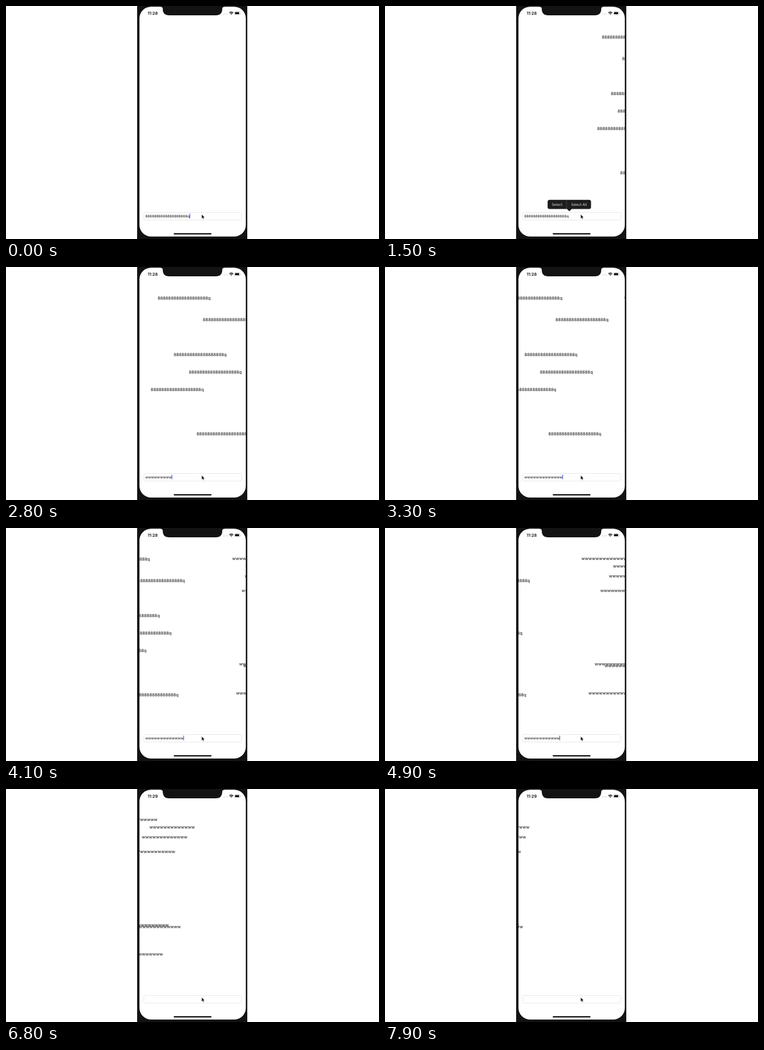
These frames come from a looping animation (640 px wide and 400 px high, 8000 ms). An HTML page:

```html
<!DOCTYPE html>
<html lang="en">
<head>
<meta charset="utf-8">
<title>Flying comments</title>
<style>
  html, body { margin: 0; width: 100%; height: 100%; overflow: hidden; background: #fff; }
  svg { display: block; width: 640px; height: 400px; }
  text { font-family: Inter, Roboto, sans-serif; fill: #0c0c0c; text-rendering: geometricPrecision; white-space: pre; }
  .msg { font-size: 7.35px; }
  .field { font-size: 6.15px; }
  .clock { font-size: 7.2px; font-weight: 600; }
  .menu text { font-size: 6.1px; fill: #e2e2e2; }
</style>
</head>
<body>
<svg viewBox="0 0 640 400">
  <defs>
    <clipPath id="screen"><rect x="228.5" y="1" width="183.3" height="395" rx="20"/></clipPath>
  </defs>

  <rect x="225" width="189" height="400" fill="#131313"/>
  <rect x="229" y="1.2" width="182.5" height="394.6" rx="20" fill="#fff"/>
  <path d="M265 0H375V1.2Q371 1.2 371 5Q371 16 360 16H280Q269 16 269 5Q269 1.2 265 1.2Z" fill="#131313"/>

  <text id="clock" class="clock" x="243" y="14.9">11:28</text>
  <g fill="#b4b4b4">
    <circle cx="373.5" cy="13.6" r=".6"/><circle cx="375.7" cy="13.6" r=".6"/>
    <circle cx="377.9" cy="13.6" r=".6"/><circle cx="380.1" cy="13.6" r=".6"/>
  </g>
  <g fill="none" stroke="#111" stroke-width="1.3">
    <path d="M383.2 11.5Q386.6 8.6 390 11.5"/>
    <path d="M384.5 13.1Q386.6 11.3 388.7 13.1"/>
  </g>
  <path d="M385.5 14.1Q386.6 13.2 387.7 14.1L386.6 15.2Z" fill="#111"/>
  <rect x="392.2" y="9.9" width="9.7" height="4.9" rx="1.4" fill="none" stroke="#999" stroke-width=".5"/>
  <rect x="393" y="10.6" width="7" height="3.5" rx=".7" fill="#111"/>
  <path d="M402.6 11.5Q403.6 12.3 402.6 13.2Z" fill="#999"/>

  <g id="messages" clip-path="url(#screen)"></g>

  <rect x="236.5" y="354.5" width="168" height="13" rx="2.2" fill="#fff" stroke="#e2e2e2" stroke-width=".8"/>
  <text id="field" class="field" x="239" y="363"></text>
  <rect id="caret" y="356.5" width="1" height="8"/>

  <g id="menu" class="menu">
    <path d="M282.5 332.8H350Q353.5 332.8 353.5 336.3V345Q353.5 348.5 350 348.5H320.3L316.3 352.4L312.3 348.5H282.5Q279 348.5 279 345V336.3Q279 332.8 282.5 332.8Z" fill="#1d1d1d"/>
    <path d="M311.6 332.8V348.5" stroke="#666" stroke-width=".5"/>
    <text x="286.2" y="342.9">Select</text>
    <text x="319.4" y="342.9">Select All</text>
  </g>

  <rect x="287.7" y="389.9" width="65" height="2.3" rx="1.15" fill="#111"/>
  <path d="M335.8 357.8V365L337.4 363.5L338.5 366.1L339.8 365.5L338.7 363H340.9Z" fill="#000" stroke="#fff" stroke-width=".5"/>
</svg>

<script>
  const LOOP = 8000, STEP = 100, FLIGHT = 5000, ENTRY = 411.5;
  const byId = id => document.getElementById(id);
  const eights = "8".repeat(19) + "q";
  const ws = n => "w".repeat(n);

  // Each entry: start time in ms, baseline
  const volleys = [
    { text: eights, travel: 283.5, shots: [[80, 212.6], [202, 56], [484, 152.6], [760, 182.6], [908, 289], [1035, 93]] },
    { text: ws(13), travel: 264.5, shots: [[3060, 55.4], [3217, 285.5], [3368, 236.3], [3517, 109.8], [3640, 239.3], [3780, 84.9], [3930, 67.6]] }
  ];

  function addMessage(text, travel, start, y) {
    const node = document.createElementNS("http://www.w3.org/2000/svg", "text");
    node.setAttribute("class", "msg");
    node.setAttribute("y", y);
    node.textContent = text;
    byId("messages").append(node);
    return { node, travel, start };
  }
  const messages = volleys.flatMap(({ text, travel, shots }) =>
    shots.map(([start, y]) => addMessage(text, travel, start, y)));

  // cubic-bezier(.42, 0, .58, 1)
  function easeInOut(x) {
    let lo = 0, hi = 1;
    for (let i = 0; i < 24; i++) {
      const s = (lo + hi) / 2;
      if (1.26 * s - 0.78 * s * s + 0.52 * s ** 3 < x) lo = s; else hi = s;
    }
    return lo * lo * (3 - 2 * lo);
  }

  function fieldText(t) {
    if (t < 1700) return eights;
    if (t < 2400) return "";
    if (t < 4800) return ws(Math.min(13, 1 + Math.floor((t - 2400) / 45)));
    return ws(Math.max(0, Math.min(12, Math.round(12 * (5400 - t) / 500))));
  }

  function caretOn(t) {
    if (t < 1700) return t < 500;
    if (t < 6500) return true;
    return t >= 7000 && t < 7500;
  }

  function draw(t) {
    for (const { node, travel, start } of messages) {
      const p = (t - start) / FLIGHT;
      const flying = p > 0 && p < 1;
      node.style.display = flying ? "" : "none";
      if (flying) node.setAttribute("x", (ENTRY - travel * easeInOut(p)).toFixed(2));
    }
    const field = byId("field"), caret = byId("caret"), text = fieldText(t);
    field.textContent = text;
    caret.setAttribute("x", 239 + (text ? field.getComputedTextLength() : 0.2));
    caret.setAttribute("fill", text && t < 4800 ? "#3648e0" : "#454563");
    caret.style.display = caretOn(t) ? "" : "none";
    byId("menu").style.display = t >= 600 && t < 1700 ? "" : "none";
    byId("clock").textContent = t < 5200 ? "11:28" : "11:29";
  }

  const origin = performance.now();
  function tick() {
    const t = (performance.now() - origin) % LOOP;
    draw(Math.floor(t / STEP) * STEP);
    requestAnimationFrame(tick);
  }
  tick();
</script>
</body>
</html>
```
